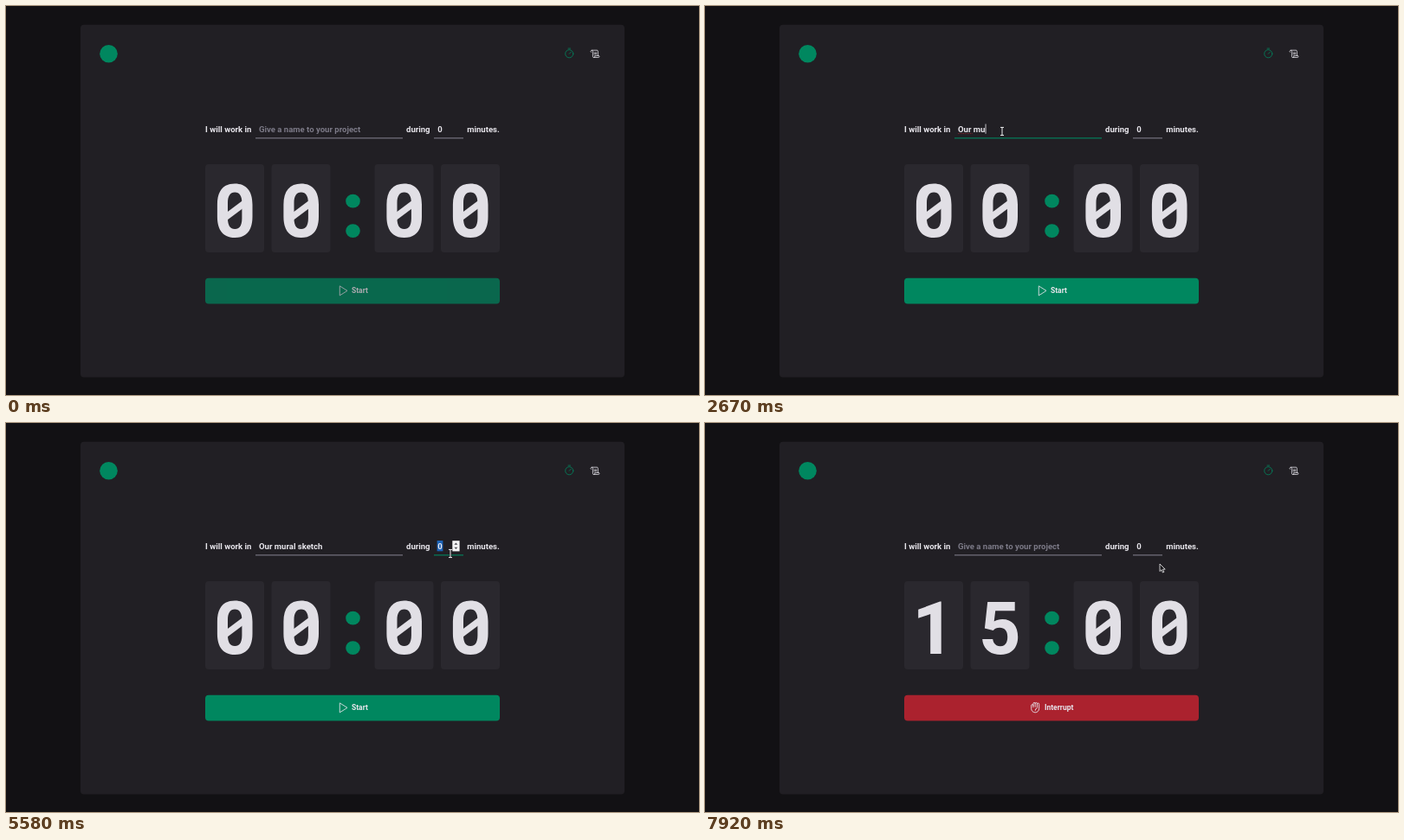
Write an HTML page that moves like this. It is 800 by 450 pixels and loops after 8000 ms.

```html
<!DOCTYPE html>
<html lang="en">
<head>
<meta charset="utf-8">
<title>Work timer</title>
<style>
html, body { margin: 0; width: 100%; height: 100%; overflow: hidden; background: #121114; }
svg { display: block; width: 800px; height: 450px; }
text { font: 700 9.55px Roboto, Arial, sans-serif; fill: #e8e6ec; white-space: pre; }
.hint { fill: #7c7a87; }
.icon { fill: none; stroke: #e8e6ec; stroke-width: 16; stroke-linecap: round; stroke-linejoin: round; }
#button text { font-size: 8.5px; }
#menu text { font: 400 6.6px "Open Sans", "Noto Sans", sans-serif; fill: #f4f4f6; }
.pointer { stroke-linejoin: round; }
</style>
</head>
<body>
<svg viewBox="0 0 800 450">
  <defs>
    <g id="d0">
      <path fill-rule="evenodd" d="M20.3-7V7C20.3 23 13 31.3 0 31.3S-20.3 23-20.3 7V-7C-20.3-23-13-31.3 0-31.3S20.3-23 20.3-7ZM8.2-9C8.2-17 5.5-21.3 0-21.3S-8.2-17-8.2-9V9C-8.2 17-5.5 21.3 0 21.3S8.2 17 8.2 9Z"/>
      <path d="M-9 1.8L9-11.8V-2.5L-9 11Z"/>
    </g>
    <path id="d1" d="M8.5 30.3H-4V-15.7L-18-11V-21.1L7-30.2H8.5Z"/>
    <path id="d5" d="M17-29.8V-19.5H-5.5L-7-7.3C-4.5-8.8-1-9.8 2.5-9.8C14-9.8 20.5-1.8 20.5 10.7S13 31.3.5 31.3C-11.5 31.3-20 24.2-20.5 13.2H-8.5C-7.7 18.7-4.5 21.5.3 21.5C5.5 21.5 8.5 17.7 8.5 10.7S5.2 0-.5 0C-4 0-6.1 1.2-8 3.2L-17.8.7L-14.5-29.8Z"/>
  </defs>

  <rect x="86" y="21.7" width="628" height="407.8" rx="4" fill="#211f24"/>
  <circle cx="118.5" cy="55.3" r="10.3" fill="#00875f"/>
  <g class="icon" style="stroke:#00875f" transform="translate(643.9 48.7) scale(.0497)">
    <circle cx="128" cy="132" r="92"/><path d="M128 132L168 92M104 8H152"/>
  </g>
  <path class="icon" transform="translate(673.4 48.8) scale(.0497)" d="M37 90A24 24 0 1 1 80 72V192a24 24 0 0 0 48 0c0-13-8-16-8-16h104s8 8 8 16a24 24 0 0 1-24 24H104M56 48h120a24 24 0 0 1 24 24v104M112 104h56M112 136h56"/>

  <text x="230" y="146">I will work in</text>
  <text x="462" y="146">during</text>
  <text x="532.2" y="146">minutes.</text>
  <rect id="nameLine" x="288" y="152.3" width="170" height="1.1"/>
  <rect id="minLine" x="494" y="152.3" width="34" height="1.1"/>
  <text id="name" x="292" y="145.5"></text>
  <path id="spell" d="M292 147.6h16.5" stroke="#c8323c" stroke-width=".8" stroke-dasharray="1.2 .8" opacity=".7"/>
  <rect id="selection" x="497.6" y="136" width="6.8" height="12.3" fill="#1c63b7"/>
  <text id="minutes" x="498.2" y="145.8"></text>
  <g id="spinner">
    <rect x="515.3" y="136.2" width="8.3" height="12.2" fill="#f4f4f6"/>
    <path d="M517.4 140.8l2-2.3 2 2.3zM517.4 143.8l2 2.3 2-2.3z" fill="#4a4a50"/>
  </g>
  <rect id="caret" y="136.5" width=".8" height="11.3" fill="#f0eef3"/>

  <g id="cards" fill="#2a282e"></g>
  <g id="digits" fill="#e1dfe5"></g>
  <g fill="#00875f">
    <ellipse cx="400.5" cy="225.7" rx="8.3" ry="7.9"/>
    <ellipse cx="400.5" cy="260.1" rx="8.3" ry="7.9"/>
  </g>

  <g id="button">
    <rect id="buttonBack" x="230" y="314.7" width="340" height="29.8" rx="4"/>
    <g id="startLabel">
      <path class="icon" style="stroke-width:.85" d="M385.6 324.1L394 329.4L385.6 334.7Z"/>
      <text x="399" y="332.3">Start</text>
    </g>
    <g id="stopLabel">
      <path class="icon" transform="translate(374 322.1) scale(.056)" d="M168 56a20 20 0 0 1 40 0v92a80 80 0 0 1-160 0V84a20 20 0 0 1 40 0v36M88 84V44a20 20 0 0 1 40 0v68M128 44a20 20 0 0 1 40 0v76M128 184a48 48 0 0 1 40-48"/>
      <text x="392" y="332.3">Interrupt</text>
    </g>
  </g>

  <g id="menu"></g>

  <g id="cursor" class="pointer">
    <path id="arrow" d="M0 0V8.6L2 6.8L3.4 10L4.9 9.3L3.5 6.2H6.2Z" fill="#1b1a1e" stroke="#f0f0f2" stroke-width=".8"/>
    <g id="beam" fill="none">
      <path d="M-2-4.6h4M0-4.6V4.6M-2 4.6h4" stroke="#17161a" stroke-width="2.2"/>
      <path d="M-2-4.6h4M0-4.6V4.6M-2 4.6h4" stroke="#f4f4f6"/>
    </g>
    <path id="hand" d="M-1 0Q0-1 1 0V4L5 5Q6 5.3 6 6.5L5.4 11.6H.4L-3 7.5Q-3.2 6-1 7Z" fill="#f6f6f8" stroke="#17161a" stroke-width=".5"/>
  </g>
</svg>
<script>
const $ = id => document.getElementById(id);
const show = (id, on) => $(id).setAttribute("visibility", on ? "visible" : "hidden");
const fill = (id, color) => $(id).setAttribute("fill", color);

const LOOP = 8000, FPS = 12;
const NAME = "Our mural sketch";
const OPTIONS = ["Tarefa 7", "Big shed rebuild", "Completed mosaic", "Weekend pottery"];
const CARD_X = [230, 306.5, 425.5, 502];
const GREEN = "#00875f", GREEN_DARK = "#015f43", RED = "#ab222e", RED_DARK = "#7a1921", GREY = "#7c7a87";

// Moments on the 12-per-second clock
const NAME_FOCUS = 15, TYPE = 23, TYPED = 48, MIN_FOCUS = 59, SELECT = 61, ONE = 76, FIFTEEN = 78, RUN = 85;

// Pointer path: step, x, y
const PATH = [
  [1, 696, 325], [10, 561, 255], [14, 343, 145], [51, 343, 145], [56, 516, 143], [58, 516, 144],
  [60, 513, 151], [77, 513, 151], [80, 608, 240], [83, 527, 334], [84, 527, 334],
  [85, 522, 348], [87, 524, 362], [95, 525, 163]
];

$("cards").innerHTML = CARD_X.map(x => `<rect x="${x}" y="183" width="68" height="102" rx="4"/>`).join("");

function pointerAt(k) {
  const i = PATH.findIndex(p => p[0] >= k);
  if (i < 1) return PATH[0].slice(1);
  const [a, ax, ay] = PATH[i - 1], [b, bx, by] = PATH[i];
  const u = (k - a) / (b - a);
  return [ax + (bx - ax) * u, ay + (by - ay) * u];
}

function drawPointer(k, x, y, overButton) {
  const inField = y > 133 && y < 156 && x > 288 && x < 528 && k < RUN;
  const kind = overButton ? "hand" : inField ? "beam" : "arrow";
  for (const id of ["arrow", "beam", "hand"]) show(id, k > 0 && id === kind);
  $("cursor").setAttribute("transform", `translate(${x} ${y})`);
}

function drawMenu(count) {
  const items = count === 1 ? OPTIONS : count === 2 ? [OPTIONS[2]] : [];
  $("menu").innerHTML = items.length
    ? `<path d="M346 158.5l5-4 5 4z" fill="#29282d"/><rect x="340" y="158" width="76" height="${items.length * 19.1 + 4.5}" rx="1.5" fill="#242327"/>` +
      items.map((s, i) => `<text x="346.5" y="${172.4 + i * 19.1}">${s}</text>`).join("")
    : "";
}

function drawCaret(k, count) {
  const running = k >= RUN, inMinutes = k >= MIN_FOCUS;
  const since = k >= FIFTEEN ? FIFTEEN : inMinutes ? MIN_FOCUS : k >= TYPED ? TYPED : NAME_FOCUS;
  const typing = k >= TYPE && k < TYPED || k >= ONE && k < FIFTEEN;
  const selected = k >= SELECT && k < ONE;
  const on = running ? k < RUN + 3 : k >= NAME_FOCUS && !selected && (typing || (k - since) % 12 < 6);
  show("caret", on);
  const width = id => $(id).getComputedTextLength();
  const x = running ? 498 : inMinutes ? 498.4 + width("minutes") : 292.2 + (count ? width("name") : 0);
  $("caret").setAttribute("x", x);
}

function draw(k) {
  const running = k >= RUN;
  const count = k < TYPE || running ? 0 : Math.min(NAME.length, 1 + Math.floor((k - TYPE) * 0.6 + 1e-6));
  const nameFocus = k >= NAME_FOCUS && k < MIN_FOCUS;
  const minFocus = k >= MIN_FOCUS && !running;
  const [x, y] = pointerAt(k);
  const overButton = x > 230 && x < 570 && y > 314 && y < 345;

  $("name").textContent = count ? NAME.slice(0, count) : "Give a name to your project";
  $("name").setAttribute("class", count ? "" : "hint");
  $("minutes").textContent = running || k < ONE ? "0" : k < FIFTEEN ? "1" : "15";
  fill("nameLine", nameFocus ? GREEN : GREY);
  fill("minLine", minFocus ? GREEN : GREY);
  show("spell", nameFocus && count > 3);
  show("selection", k >= SELECT && k < ONE);
  show("spinner", minFocus || k >= 55 && k < MIN_FOCUS);
  drawCaret(k, count);
  drawMenu(count);

  $("digits").innerHTML = [...(running ? "1500" : "0000")]
    .map((d, i) => `<use href="#d${d}" x="${CARD_X[i] + 34.2}" y="236.8"/>`).join("");

  fill("buttonBack", running ? (overButton ? RED_DARK : RED) : overButton ? GREEN_DARK : GREEN);
  $("button").setAttribute("opacity", running || count ? 1 : 0.7);
  show("startLabel", !running);
  show("stopLabel", running);
  drawPointer(k, x, y, overButton);
}

const start = performance.now();
let last = -1;
function tick() {
  const t = (performance.now() - start) % LOOP;
  const k = Math.min(95, Math.floor((t + 4) * FPS / 1000));
  if (k !== last) draw(last = k);
  requestAnimationFrame(tick);
}
tick();
</script>
</body>
</html>
```
